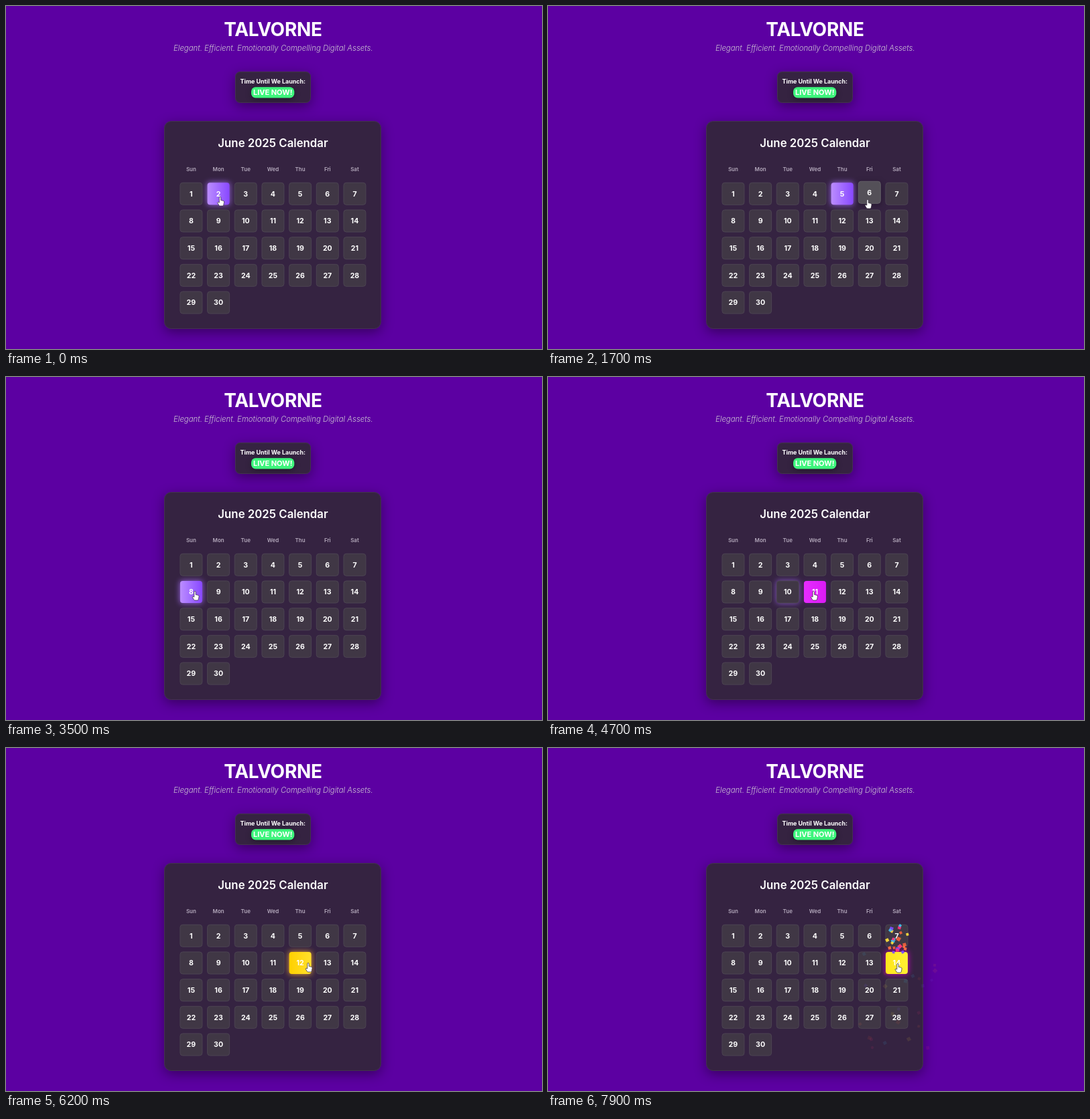
An HTML page that plays this animation: 800 by 513 pixels, repeating every 8000 ms.

```html
<!DOCTYPE html>
<html lang="en">
<head>
<meta charset="utf-8">
<title>Launch calendar</title>
<style>
  html, body { margin: 0; width: 100%; height: 100%; overflow: hidden; background: #5c00a2; }
  svg { display: block; width: 100vw; height: 100vh; }
  text { font-family: Inter, sans-serif; fill: #fff; text-anchor: middle; }
  .brand { font-size: 28px; font-weight: 700; letter-spacing: -.3px; }
  .tagline { font-size: 11.4px; font-weight: 300; font-style: italic; fill: #ccc4d2; }
  .label { font-size: 9px; font-weight: 700; letter-spacing: -.05px; }
  .live { font-size: 11px; font-weight: 700; }
  .title { font-size: 16.8px; font-weight: 600; }
  .weekday { font-size: 8px; font-weight: 600; fill: #b5aabd; }
  .day { font-size: 10.6px; font-weight: 700; }
  .panel { fill: #352341; stroke: #43334e; filter: drop-shadow(0 5px 9px rgba(0, 0, 0, .4)); }
  .pill { fill: #3df57c; filter: drop-shadow(0 2px 4px rgba(0, 0, 0, .35)); }
  .glow { filter: blur(4.5px); }
</style>
</head>
<body>
<svg viewBox="0 0 800 513">
  <defs id="defs"></defs>
  <rect width="800" height="513" fill="#5c00a2"/>
  <text class="brand" x="398.5" y="45">TALVORNE</text>
  <text class="tagline" x="398.8" y="67.3">Elegant. Efficient. Emotionally Compelling Digital Assets.</text>
  <rect class="panel" x="342.5" y="98.5" width="112" height="46" rx="7"/>
  <text class="label" x="398.3" y="116">Time Until We Launch:</text>
  <rect class="pill" x="366" y="121.3" width="64.3" height="16.2" rx="6.5"/>
  <text class="live" x="398.2" y="133">LIVE NOW!</text>
  <rect class="panel" x="236.5" y="172.5" width="323" height="310" rx="10"/>
  <text class="title" x="398.5" y="211.3">June 2025 Calendar</text>
  <g id="weekdays"></g>
  <g id="glows"></g>
  <g id="days"></g>
  <g id="confetti"></g>
  <path id="hand" fill="#fff" stroke="#2a2230" stroke-width=".7" stroke-linejoin="round"
    d="M-1.2 1.2a1.2 1.2 0 0 1 2.4 0V5l3.5.8q1.5.4 1.4 1.8l-.7 4q-.3 1.9-1.7 1.9H0q-1 0-1.6-.8L-4 8.6q.6-1.5 2.8 0Z"/>
</svg>
<script>
const LOOP = 8000, STEP = 100;
const PITCH = 40.68, SIZE = 34, FIRST_X = 276.4, FIRST_Y = 280.8;
const GLOW_FADE = 300, CONFETTI_LIFE = 720;

const byId = id => document.getElementById(id);

function add(parent, tag, attrs, text) {
  const node = document.createElementNS('http://www.w3.org/2000/svg', tag);
  set(node, attrs);
  if (text !== undefined) node.textContent = text;
  parent.append(node);
  return node;
}

function set(node, attrs) {
  for (const key in attrs) node.setAttribute(key, attrs[key]);
}

function seeded(seed) {
  return () => (seed = (seed * 16807) % 2147483647) / 2147483647;
}

const themes = {
  violet: { from: '#bb8dff', to: '#8848ff', glow: '#a970ff' },
  magenta: { from: '#e62cff', to: '#dc1af5', glow: '#a93cff' },
  gold: { from: '#ffd000', to: '#ffe02c', glow: '#ffb23c' },
  cyan: { from: '#52efff', to: '#2ddcf0', glow: '#45dcff', scale: 1.05 },
  party: { from: '#ffe51c', to: '#fff032', glow: '#e000d0' }
};
const specialDays = { 11: 'magenta', 12: 'gold', 13: 'cyan', 14: 'party' };
const themeOf = day => specialDays[day] || 'violet';

for (const name in themes) {
  const gradient = add(byId('defs'), 'linearGradient', { id: name });
  add(gradient, 'stop', { offset: 0, 'stop-color': themes[name].from });
  add(gradient, 'stop', { offset: 1, 'stop-color': themes[name].to });
}

['Sun', 'Mon', 'Tue', 'Wed', 'Thu', 'Fri', 'Sat'].forEach((name, i) =>
  add(byId('weekdays'), 'text', { class: 'weekday', x: FIRST_X + i * PITCH, y: 247 }, name));

const box = { x: -SIZE / 2, y: -SIZE / 2, width: SIZE, height: SIZE, rx: 4 };

const days = Array.from({ length: 30 }, (_, i) => {
  const x = FIRST_X + (i % 7) * PITCH;
  const y = FIRST_Y + Math.floor(i / 7) * PITCH;
  const glow = add(byId('glows'), 'rect', { ...box, class: 'glow', transform: `translate(${x} ${y})` });
  const group = add(byId('days'), 'g', {});
  const rect = add(group, 'rect', { ...box, x: .5 + box.x, y: .5 + box.y, width: SIZE - 1, height: SIZE - 1 });
  add(group, 'text', { class: 'day', y: 3.8 }, i + 1);
  return { number: i + 1, x, y, glow, group, rect };
});

// [time, day]
const clicks = [
  [0, 2], [500, 3], [1000, 4], [1400, 5], [1900, 6], [2400, 7], [3200, 8],
  [3800, 9], [4200, 10], [4650, 11], [5400, 12], [6500, 13], [7250, 14]
];

// [time, x, y]
const path = [
  [0, 319.5, 286], [100, 322, 286], [450, 357, 287], [900, 397, 288], [1350, 438, 289],
  [1700, 477, 290], [2000, 482, 290], [2400, 520, 288], [2600, 520, 289],
  [3150, 281, 320], [3500, 282, 321], [3800, 315, 322], [4200, 357, 321],
  [4600, 396, 321], [5000, 398, 321], [5400, 440, 322], [6200, 451, 322],
  [6500, 479, 323], [6750, 483, 323], [7000, 517, 323], [7300, 522, 323], [8000, 522, 323]
];

function cursorAt(t) {
  const next = Math.max(1, path.findIndex(point => point[0] >= t));
  const [t0, x0, y0] = path[next - 1];
  const [t1, x1, y1] = path[next];
  const p = (t - t0) / (t1 - t0);
  const eased = p * p * (3 - 2 * p);
  return { x: x0 + (x1 - x0) * eased, y: y0 + (y1 - y0) * eased };
}

const random = seeded(4271);
const between = (low, high) => low + (high - low) * random();
const colors = ['#ff7043', '#ff2f7d', '#7c4dff', '#ffe03a', '#3fc1f0', '#f0603c'];
const particles = [7250, 7850].flatMap(start => Array.from({ length: 24 }, (_, i) => ({
  start,
  vx: between(-6, 6),
  vy: between(-22, -4),
  size: between(3.6, 5.6),
  angle: between(0, 90),
  spin: between(-.4, .4),
  node: add(byId('confetti'), 'rect', { fill: colors[i % colors.length] })
})));

function drawParticle(p, t) {
  const age = t - p.start;
  const alive = age >= 0 && age < CONFETTI_LIFE;
  set(p.node, { visibility: alive ? 'visible' : 'hidden' });
  if (!alive) return;
  const ticks = age / 16.7;
  const drag = (1 - .9 ** ticks) / .1;
  const x = 521 + p.vx * drag;
  const y = 305 + p.vy * drag + 4.7 * ticks;
  set(p.node, {
    x: -p.size / 2, y: -p.size / 2, width: p.size, height: p.size,
    opacity: 1 - age / CONFETTI_LIFE,
    transform: `translate(${x} ${y}) rotate(${p.angle + p.spin * age})`
  });
}

function drawDay(day, t, current, previous, cursor) {
  const { number, x, y } = day;
  const theme = themes[themeOf(number)];
  const selected = number === current[1];
  const hovered = !selected && Math.abs(cursor.x - x) < SIZE / 2 && Math.abs(cursor.y - y) < SIZE / 2;
  const fade = Math.min(1, (t - current[0]) / GLOW_FADE);
  let glow = 0;
  if (selected) glow = current === clicks[0] ? 1 : fade;
  else if (previous && number === previous[1]) glow = 1 - fade;

  set(day.glow, { fill: hovered ? '#150a1e' : theme.glow, opacity: hovered ? .5 : glow * .8 });
  set(day.group, {
    transform: `translate(${x} ${y - (hovered ? 2 : 0)}) scale(${selected && theme.scale || 1})`
  });
  set(day.rect, {
    fill: selected ? `url(#${themeOf(number)})` : hovered ? '#545058' : '#403745',
    stroke: selected ? 'none' : hovered ? '#625e66' : '#4c4452'
  });
}

function render(t) {
  const index = clicks.findLastIndex(click => click[0] <= t);
  const cursor = cursorAt(t);
  days.forEach(day => drawDay(day, t, clicks[index], clicks[index - 1], cursor));
  particles.forEach(p => drawParticle(p, t));
  set(byId('hand'), { transform: `translate(${cursor.x} ${cursor.y - .5})` });
}

const began = performance.now();
function tick() {
  const t = (performance.now() - began) % LOOP;
  render(Math.floor(t / STEP) * STEP);
  requestAnimationFrame(tick);
}
tick();
</script>
</body>
</html>
```
